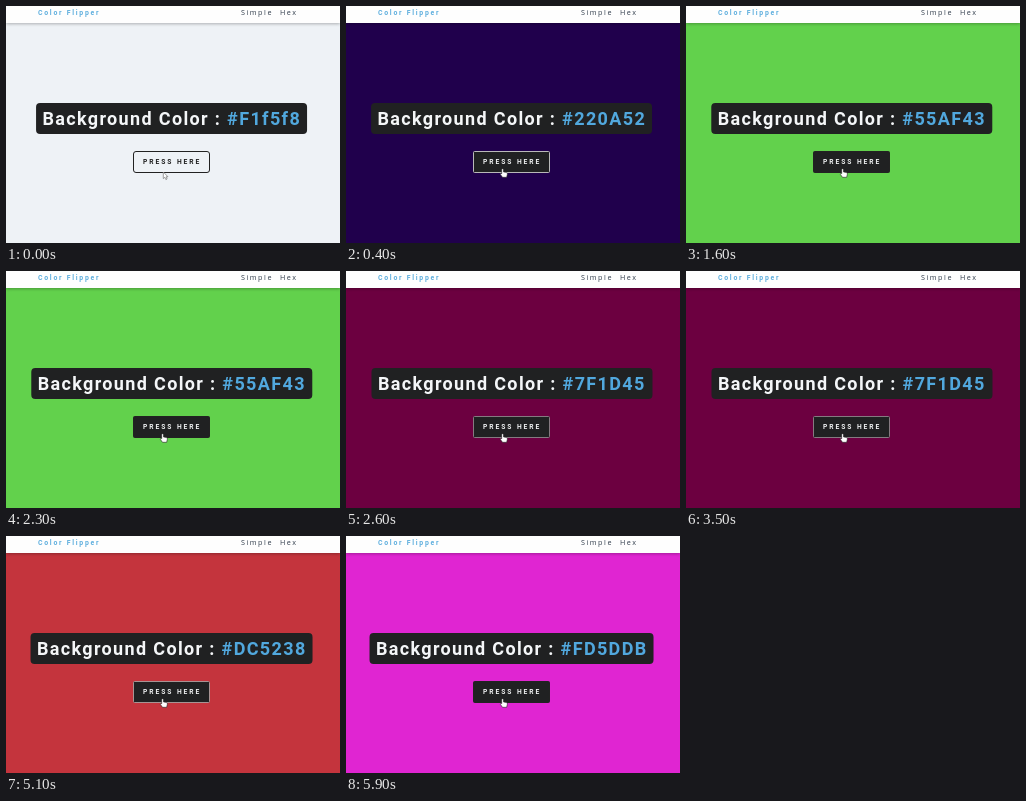
An HTML page that plays this animation: 334 by 237 pixels, repeating every 6 s.

```html
<!DOCTYPE html>
<html lang="en">
<head>
<meta charset="utf-8">
<title>Color Flipper</title>
<style>
  html, body { margin: 0; width: 100%; height: 100%; overflow: hidden; }
  body { position: relative; font-family: Roboto, sans-serif; background: #eef2f6; }
  body * { position: absolute; box-sizing: border-box; white-space: pre; }
  header { left: 0; top: 0; width: 100%; height: 17px; background: #fefefe; box-shadow: 0 1px 3px rgba(0, 0, 0, .28); }
  header span { top: 0; }
  .brand { left: 32px; font-size: 6.9px; line-height: 14px; font-weight: 600; letter-spacing: 1.72px; color: #5fafde; }
  .link { font: 500 7.2px/13.4px "Open Sans", sans-serif; letter-spacing: 1.55px; color: #2f3b4a; }
  h2 {
    left: 165.5px; top: 97px; height: 31px; margin: 0; padding: 0 6.4px 0 6.9px;
    transform: translateX(-50%); border-radius: 4px; background: #202122; color: #f4f6f8;
    font-size: 18px; line-height: 31.4px; font-weight: 600; letter-spacing: 1.35px;
  }
  h2 span { position: static; color: #51a8de; }
  .btn {
    left: 127px; top: 145px; width: 77px; height: 22px; padding-left: 9px;
    border: 1px solid #222; border-radius: 3px; color: #222;
    font-size: 6.7px; line-height: 20.4px; font-weight: 600; letter-spacing: 1.95px;
  }
  .btn.hover { background: #202122; color: #eceeef; border-radius: 1.5px; }
  svg { left: 0; top: 0; width: 334px; height: 237px; }
</style>
</head>
<body>
<header>
  <span class="brand">Color Flipper</span>
  <span class="link" style="left:235px">Simple</span>
  <span class="link" style="left:274px">Hex</span>
</header>
<h2>Background Color : <span id="hex"></span></h2>
<div class="btn" id="btn">PRESS HERE</div>
<svg viewBox="0 0 334 237" stroke-linejoin="round">
  <path id="arrow" d="M157.3 166v6.6l1.5-1.3 1.1 2.3 1.2-.6-1.1-2.2h2z" fill="#fff" stroke="#777" stroke-width=".7"/>
  <path id="hand" d="M155.7 163.2q.9-1 1.8 0v2.7l2.9.6q1.2.3 1 1.6l-.7 3.2h-4.2l-2.2-3q-.2-1.2 1.4-.6z" fill="#fff" stroke="#222" stroke-width=".6"/>
</svg>
<script>
const LOOP = 6000;
const LIGHT = '#eef2f6', DARK = '#222';

// start ms, label, page colour, button border, pointer over button
const steps = [
  [0, '#F1f5f8', LIGHT, DARK, false],
  [100, '#F1f5f8', LIGHT, DARK, true],
  [200, '#220A52', '#20004c', '#b9b9b9', true],
  [1500, '#55AF43', '#62d14c', DARK, true],
  [2400, '#7F1D45', '#6c0040', '#857a80', true],
  [4000, '#DC5238', '#c4343d', '#a89494', true],
  [5600, '#FD5DDB', '#e025d2', DARK, true]
];

const el = id => document.getElementById(id);
const hex = el('hex'), btn = el('btn'), arrow = el('arrow'), hand = el('hand');
let shown;

function show([, label, page, border, hover]) {
  hex.textContent = label;
  document.body.style.background = page;
  btn.style.borderColor = border;
  btn.classList.toggle('hover', hover);
  arrow.style.display = hover ? 'none' : '';
  hand.style.display = hover ? '' : 'none';
}

const origin = performance.now();
function tick() {
  const t = (performance.now() - origin) % LOOP;
  const step = steps.filter(s => s[0] <= t).pop();
  if (step !== shown) show(shown = step);
  requestAnimationFrame(tick);
}
tick();
</script>
</body>
</html>
```
